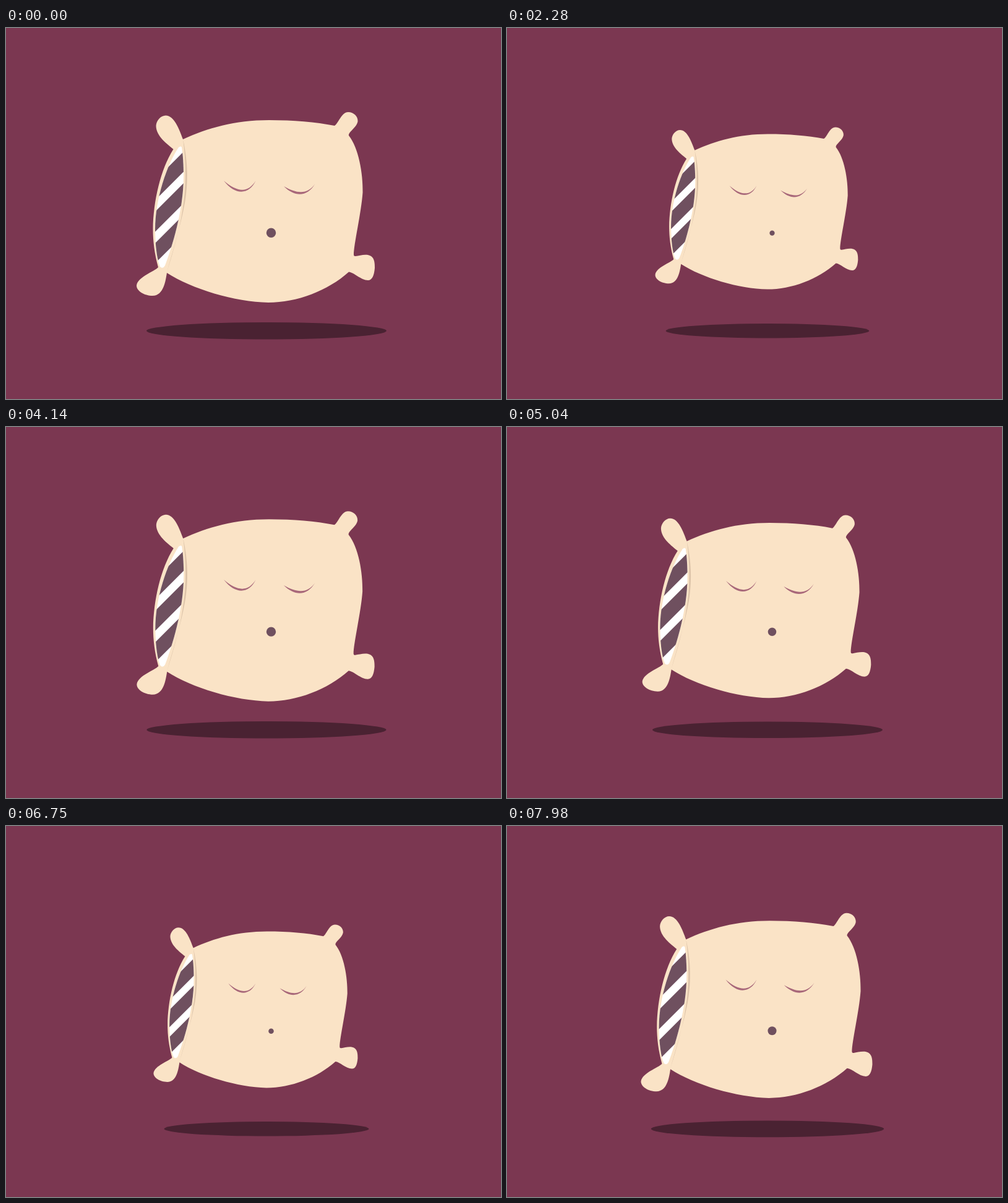
Animation of 800 by 600 pixels, one loop 8000 ms. Source, as an HTML page with a canvas:

```html
<!DOCTYPE html>
<html lang="en">
<head>
<meta charset="utf-8">
<title>Breathing pillow</title>
<style>
  html, body { margin: 0; width: 100%; height: 100%; overflow: hidden; background: #7b3751; }
  canvas { display: block; width: 800px; height: 600px; }
</style>
</head>
<body>
<canvas id="stage" width="800" height="600"></canvas>
<script>
const ctx = document.getElementById('stage').getContext('2d');
const LOOP = 8000;
const BREATH = 4300;
const CENTER = { x: 403, y: 300 };
const COLOR = {
  wall: '#7b3751', shadow: '#4a2232', cloth: '#fae3c6',
  seam: '#dcc3a8', stripe: '#6f505f', eye: '#a8687a'
};

const body = new Path2D(`M286 180
  C325 162 370 149 425 149 C465 149 500 152 531 158
  C537 155 542 136 553 136 C562 136 569 143 568.5 151 C567 161 553 168 554 174
  C570 194 577 235 576.5 266 C574 300 562 350 562 367 Q562 369.5 565 369
  C572 368 583 364.500 590 369 C596 373 596 382 596 388 C595 400 592 408 585 408
  C574 408 562 395 554 394.500
  C520 425 470 444 424 444 C370 443 300 422 260 396
  C258 408 255 433 237 433 C223 433 211 425 211 416.500 C213 402 240 394 246 387
  C240 365 237.500 345 237.500 325 C238 280 250 228 270.500 196
  C261 188 242.500 175 242.500 158 C243 150 250 141.500 258 141.500
  C272 141.500 280 164 286 180 Z`);

const opening = new Path2D(`M279 193
  C260 221 241 277 241 325 C241 350 244 375 249 386
  C252 389 255 388 257 384 C268 355 287 295 287 240
  C287 222 286 205 284 193 Q283 190 279 193 Z`);

const seam = new Path2D(`M286 180
  C294 215 296 255 286 298 C278 335 268 365 260 395
  C274 350 281 322 285 296 C292 258 291 215 286 180 Z`);

const eyes = new Path2D(`M352 247 C372 273 394 268 403.500 247
  C392 266 375 267 352 247 Z
  M449 256 C468 275 488 272 499.500 252 C487 270 470 268 449 256 Z`);

function fill(path, color) {
  ctx.fillStyle = color;
  ctx.fill(path);
}

function ellipse(x, y, rx, ry, color) {
  const path = new Path2D();
  path.ellipse(x, y, rx, ry, 0, 0, Math.PI * 2);
  fill(path, color);
}

// Diagonal bands lie between the lines x + y = sum and x + y = sum + 32.5.
function drawStripes() {
  ctx.save();
  ctx.clip(opening);
  ctx.fillStyle = COLOR.stripe;
  for (let i = 0; i < 3; i++) {
    const sum = 487 + 51 * i;
    ctx.beginPath();
    ctx.moveTo(sum - 150, 150);
    ctx.lineTo(sum - 117.5, 150);
    ctx.lineTo(sum - 367.5, 400);
    ctx.lineTo(sum - 400, 400);
    ctx.fill();
  }
  ctx.restore();
}

function drawPillow(scale) {
  ctx.save();
  ctx.translate(CENTER.x, CENTER.y);
  ctx.scale(scale, scale);
  ctx.translate(-CENTER.x, -CENTER.y);
  fill(body, COLOR.cloth);
  fill(opening, '#fff');
  drawStripes();
  fill(seam, COLOR.seam);
  fill(eyes, COLOR.eye);
  ctx.restore();
}

function draw(time) {
  const exhale = (1 - Math.cos(2 * Math.PI * (time % LOOP) / BREATH)) / 2;
  ctx.fillStyle = COLOR.wall;
  ctx.fillRect(0, 0, 800, 600);
  const spread = 1 - 0.154 * exhale;
  ellipse(421, 489.8, 194 * spread, 13.8 * spread, COLOR.shadow);
  drawPillow(1 - 0.15 * exhale);
  const mouth = 7.7 - 3.6 * exhale;
  ellipse(428.5, 331.2 + 0.5 * exhale, mouth, mouth, COLOR.stripe);
}

const start = performance.now();
function tick() {
  draw(performance.now() - start);
  requestAnimationFrame(tick);
}
tick();
</script>
</body>
</html>
```
